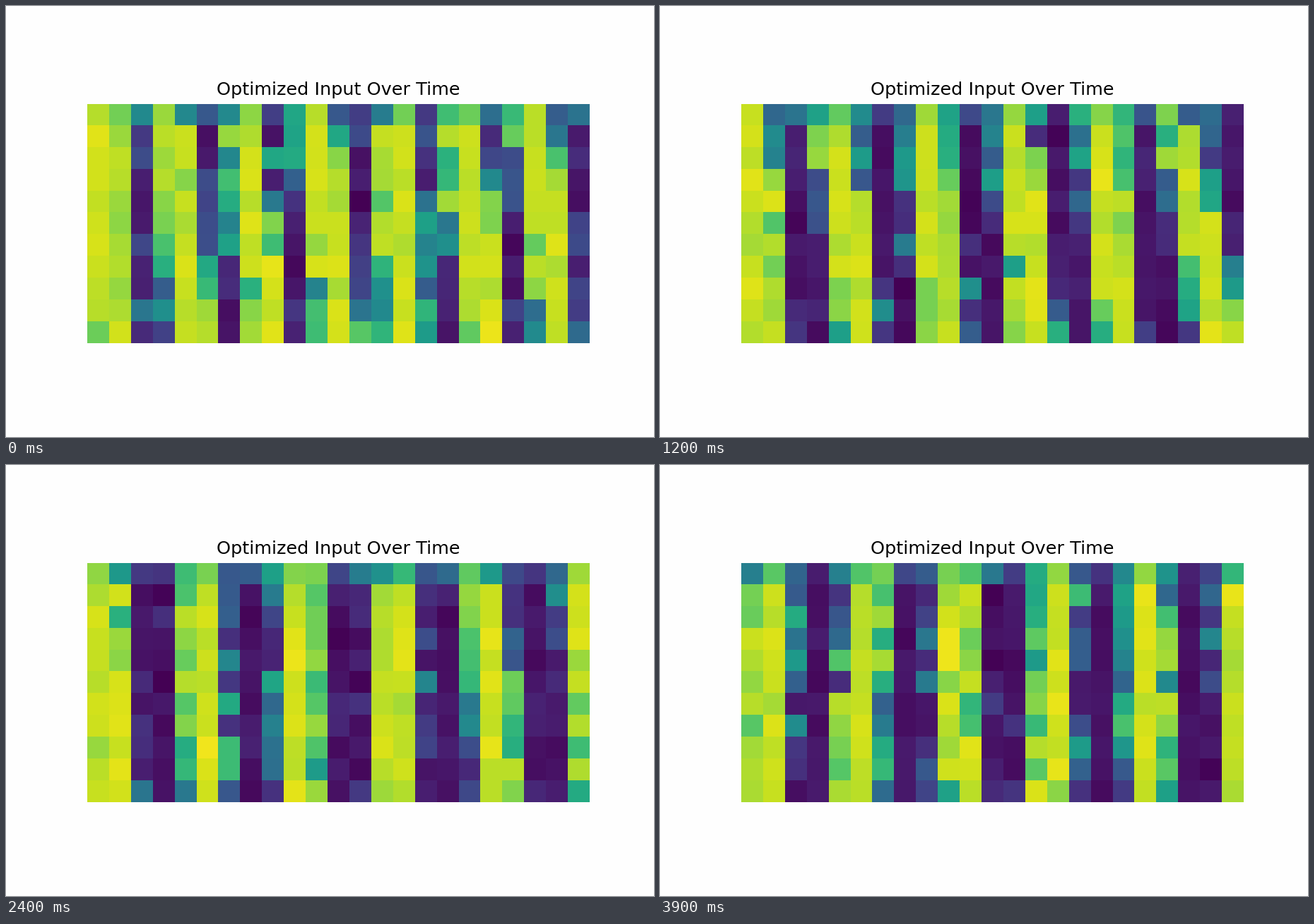
These frames come from a looping animation (917 by 611 pixels, 4 s). A matplotlib script:

```python
import numpy as np
import matplotlib.pyplot as plt
from matplotlib.animation import FuncAnimation

WIDTH, HEIGHT, DPI = 917, 611, 128
ROWS, COLS = 11, 23
FRAMES, STEP_MS = 40, 100
POINT = 152.8 / DPI  # text scale: 152.8 pixels per inch

plt.rcParams["font.family"] = "DejaVu Sans"

# Key points of the stripe pattern: first centre, spacing and lean in columns.
KEYS = [0, 9, 15, 19, 24, 30, 39]
START = [.4, -.1, .7, .2, .4, 1.4, .7]
PITCH = [3.35, 3.9, 4.15, 4.15, 4.4, 4.1, 4.35]
LEAN = [.8, .5, 1.4, .8, .5, .6, 0]


def stripe_distance(frame, rng):
    """Distance in columns of every cell from the nearest bright stripe."""
    start, pitch, lean = (np.interp(frame, KEYS, curve)
                          for curve in (START, PITCH, LEAN))
    count = int(COLS / pitch) + 2
    down = np.linspace(-.5, .5, ROWS)[:, None]
    centres = start + pitch * np.arange(count) + lean * down
    centres = centres + rng.normal(0, .4, count) * down  # uneven leans
    return np.abs(np.arange(COLS) - centres[..., None]).min(axis=1)


def grid(frame):
    rng = np.random.default_rng(100 + frame)
    level = 6 * (1.05 - stripe_distance(frame, rng))
    level += rng.normal(0, 1, level.shape)
    level[0] = .35 * level[0] + rng.normal(0, .5, COLS)  # softer top row
    value = .03 + .91 / (1 + np.exp(-np.clip(level, -4, 4)))
    return np.clip(value + rng.normal(0, .022, value.shape), 0, 1)


fig, ax = plt.subplots(figsize=(WIDTH / DPI, HEIGHT / DPI), dpi=DPI,
                       facecolor="#fefefe")
fig.subplots_adjust(left=.125, right=.9, bottom=.11, top=.88)
image = ax.imshow(grid(0), cmap="viridis", vmin=0, vmax=1,
                  interpolation="nearest")
ax.set_title("Optimized Input Over Time", fontsize=12 * POINT, pad=6 * POINT)
ax.axis("off")


def update(frame):
    image.set_data(grid(frame))
    return [image]


anim = FuncAnimation(fig, update, frames=FRAMES, interval=STEP_MS,
                     repeat=True, repeat_delay=0)
plt.show()
```
